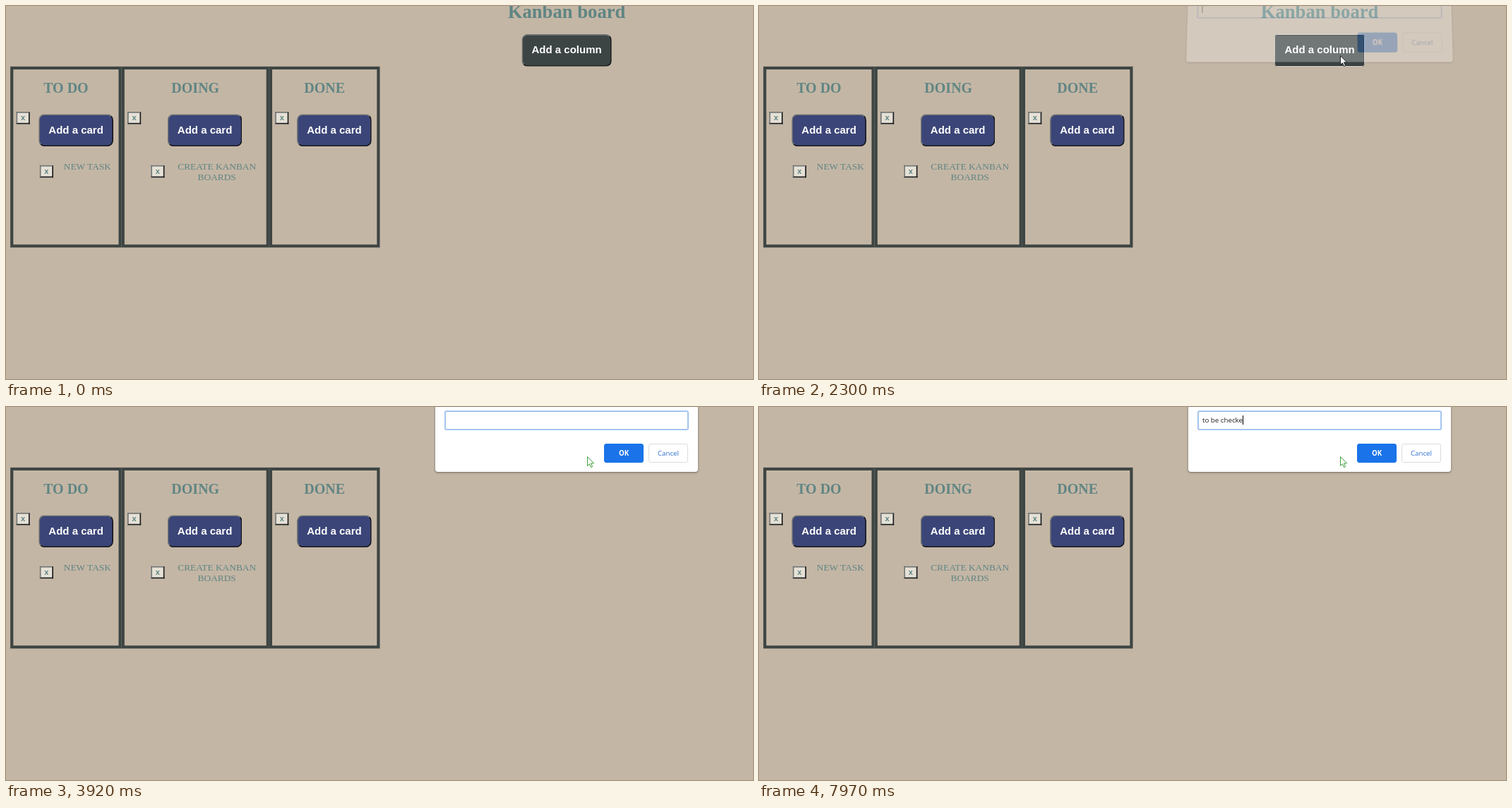
An HTML page that plays this animation: 1058x529 px, repeating every 8 s.

```html
<!DOCTYPE html>
<html lang="en">
<head>
<meta charset="utf-8">
<title>Kanban board</title>
<style>
  html, body { margin: 0; width: 100%; height: 100%; overflow: hidden; background: #c4b6a5; }
  body { position: relative; color: #5f8583; }
  body * { position: absolute; box-sizing: border-box; white-space: nowrap; }

  /* the board is laid out at full size and shown at 5/6 */
  .page { left: 0; top: 0; width: 1270px; height: 635px; transform-origin: 0 0; transform: translateX(-.5px) scale(.83333); }

  .title, .head, .task { text-align: center; font-family: "Liberation Serif", "Times New Roman", serif; }
  .title { left: 833px; top: -9px; width: 241px; font-size: 32px; font-weight: bold; line-height: 36px; }
  .column { top: 103px; height: 308px; border: 5px solid #3d4543; }
  .head { left: 0; right: 0; top: 19px; font-size: 24px; font-weight: bold; line-height: 27px; }
  .task { top: 265px; width: 160px; font-size: 16px; line-height: 18px; }

  .btn, .x {
    left: var(--x); top: var(--y);
    display: flex; align-items: center; justify-content: center;
    font-family: "Liberation Sans", Arial, sans-serif; font-weight: bold;
    border: 2px solid; border-color: #707474 #17191b #17191b #707474;
  }
  .btn { width: 127px; height: 55px; border-radius: 10px; background: #3b4578; color: #fff; font-size: 18px; }
  .btn.add { width: 153px; background: #3d4444; animation: focus 8s step-end infinite; }
  .x { width: 23px; height: 21px; background: #e6e1d6; font-size: 13.33px; }

  .dialog {
    left: 608px; top: -60px; width: 372px; height: 152px;
    background: #fff; border-radius: 0 0 4px 4px;
    box-shadow: 0 1px 3px rgba(0, 0, 0, .45);
    font-family: "Open Sans", "Noto Sans", sans-serif; font-size: 9.75px;
    transform-origin: 186px 60px;
    animation: open 8s step-end infinite;
  }
  .field {
    left: 13px; top: 65px; width: 346px; height: 28px; padding-left: 5px;
    border: 2px solid #a5c5ef; border-radius: 3px;
    color: #202124; line-height: 24px; white-space: pre;
  }
  .field * { position: static; white-space: pre; }
  #caret { display: inline-block; width: 1px; height: 13px; vertical-align: -3px; background: #000; animation: ink 8s step-end infinite; }
  .choice { top: 112px; width: 56px; height: 27px; border-radius: 3px; line-height: 25px; text-align: center; border: 1px solid #dadce0; }
  .ok { left: 239px; background: #1a73e8; border-color: #1a73e8; color: #fff; font-weight: 700; }
  .cancel { left: 302px; color: #2c70cc; font-weight: 500; }

  .cursor { left: 0; top: 0; width: 14px; height: 20px; overflow: visible; animation: move 8s step-end infinite; }
  .cursor path { fill: #fff; stroke: #222; stroke-width: 1; animation: tint 8s step-end infinite; }

  @keyframes move {
    0% { visibility: hidden; transform: translate(957px, 369px); }
    13.125% { visibility: visible; transform: translate(957px, 369px); }
    14.125% { visibility: visible; transform: translate(937px, 198px); }
    15% { visibility: visible; transform: translate(922px, 148px); }
    16% { visibility: visible; transform: translate(910px, 124px); }
    17% { visibility: visible; transform: translate(891px, 85px); }
    17.875% { visibility: visible; transform: translate(867px, 68px); }
    18.875% { visibility: visible; transform: translate(845px, 60px); }
    19.75% { visibility: visible; transform: translate(830px, 64px); }
    20.75%, 100% { visibility: visible; transform: translate(823px, 70px); }
  }
  @keyframes tint {
    0% { stroke: #222; }
    30.625%, 100% { stroke: #3f9b3a; }
  }
  @keyframes ink {
    0% { background: #000; }
    30.625% { background: #35b44a; }
    31.625%, 100% { background: #000; }
  }
  @keyframes focus {
    0% { border-color: #707474 #17191b #17191b #707474; border-radius: 10px; outline: 0 solid #fff; outline-offset: -1px; }
    26.625%, 100% { border-color: #101010; border-radius: 4px; outline: 1px solid #fff; outline-offset: -1px; }
  }
  /* the prompt tilts towards the viewer as it fades in */
  @keyframes open {
    0% { opacity: 0; transform: none; }
    27.625% { opacity: .08; transform: matrix3d(1,0,0,0, 0,1.03,0,-.0002, 0,0,1,0, 0,-22,0,1); }
    28.625% { opacity: .27; transform: matrix3d(1,0,0,0, 0,1.025,0,-.00016, 0,0,1,0, 0,-16,0,1); }
    29.625% { opacity: .53; transform: matrix3d(1,0,0,0, 0,1.02,0,-.00012, 0,0,1,0, 0,-10.5,0,1); }
    30.625% { opacity: 1; transform: translateY(-2px); }
    31.625%, 100% { opacity: 1; transform: none; }
  }
</style>
</head>
<body>
  <div class="page">
    <div class="title">Kanban board</div>
    <div class="btn add" style="--x:877px;--y:48px">Add a column</div>

    <div class="column" style="left:8px;width:189px"><div class="head">TO DO</div></div>
    <div class="column" style="left:197px;width:251px"><div class="head">DOING</div></div>
    <div class="column" style="left:448px;width:188px"><div class="head">DONE</div></div>

    <div class="x" style="--x:18px;--y:180px">x</div>
    <div class="x" style="--x:207px;--y:180px">x</div>
    <div class="x" style="--x:458px;--y:180px">x</div>
    <div class="btn" style="--x:56px;--y:184px">Add a card</div>
    <div class="btn" style="--x:275px;--y:184px">Add a card</div>
    <div class="btn" style="--x:495px;--y:184px">Add a card</div>

    <div class="x" style="--x:58px;--y:271px">x</div>
    <div class="task" style="left:59px">NEW TASK</div>
    <div class="x" style="--x:247px;--y:271px">x</div>
    <div class="task" style="left:279px">CREATE KANBAN<br>BOARDS</div>
  </div>

  <div class="dialog">
    <div class="field"><span id="typed"></span><span id="caret"></span></div>
    <div class="choice ok">OK</div>
    <div class="choice cancel">Cancel</div>
  </div>

  <svg class="cursor" viewBox="0 0 14 20"><path d="M.5 .5V13.4L3.4 10.7 5.5 15.6 7.6 14.7 5.5 9.9H9.6Z"/></svg>

<script>
  const LOOP = 8000;
  const phrase = "to be checke";
  const keys = [6340, 6410, 6640, 6810, 6960, 7190, 7340, 7420, 7590, 7740, 7810, 7970];
  const blinks = [2840, 3370, 3920, 4460, 4920, 5470, 6020, 6340];
  const typed = document.getElementById("typed");
  const caret = document.getElementById("caret");
  const passed = (times, t) => times.filter(at => at <= t).length;
  let start;

  function tick(now) {
    start ??= now;
    const t = (now - start) % LOOP;
    typed.textContent = phrase.slice(0, passed(keys, t));
    caret.style.opacity = passed(blinks, t) % 2 ? 0 : 1;
    requestAnimationFrame(tick);
  }
  requestAnimationFrame(tick);
</script>
</body>
</html>
```
